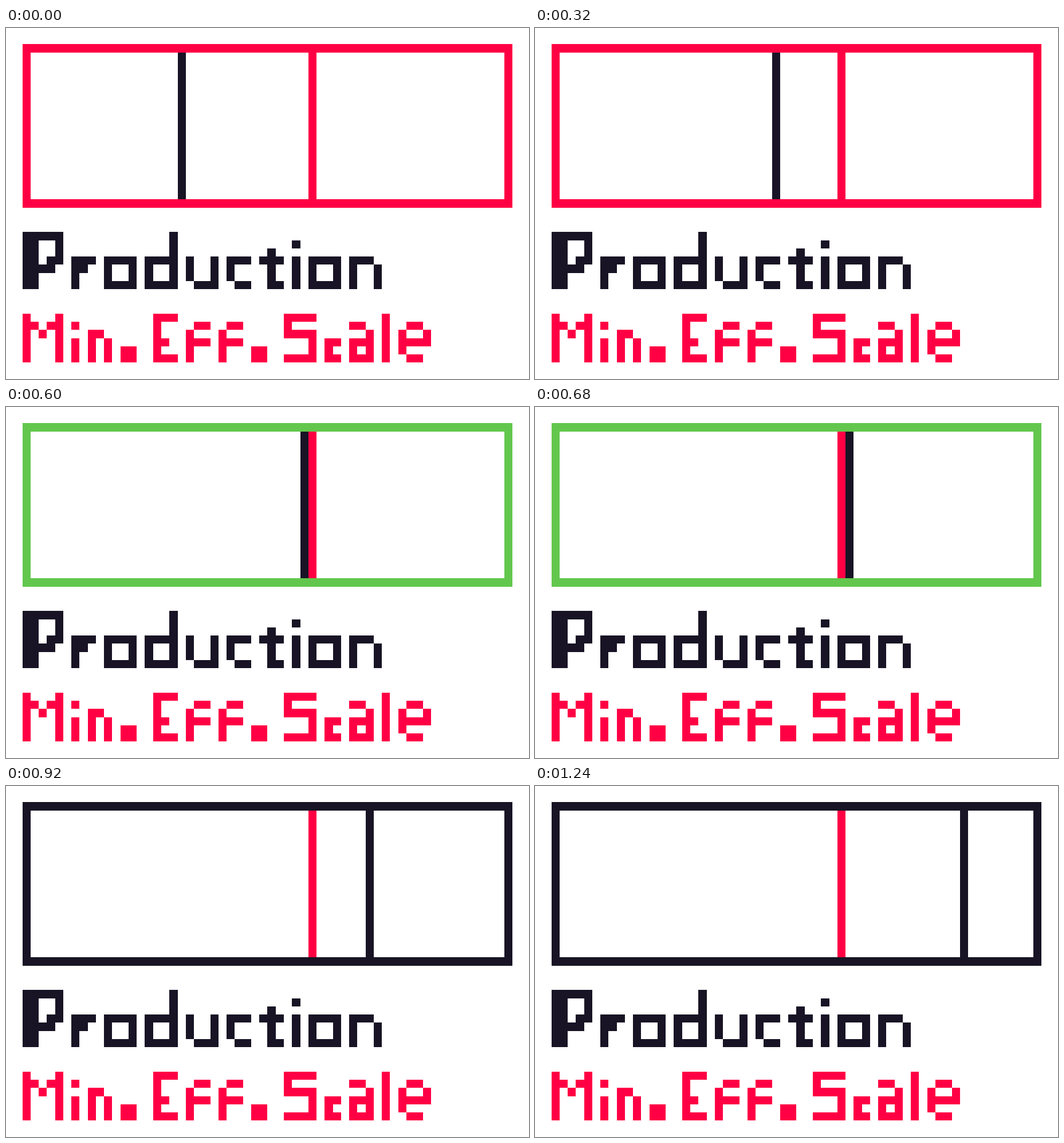
These frames come from a looping animation (913 by 613 pixels, 1280 ms). An HTML page:

```html
<!DOCTYPE html>
<html lang="en">
<head>
<meta charset="utf-8">
<title>Production and minimum efficient scale</title>
<style>
  html, body { margin: 0; width: 100%; height: 100%; overflow: hidden; background: #fff; }
  svg { display: block; width: 913px; height: 613px; }
  path { fill-rule: evenodd; }
</style>
</head>
<body>
<svg viewBox="0 0 913 613" shape-rendering="crispEdges" role="img" aria-label="Production, Min. Eff. Scale"></svg>
<script>
const RED = '#ff0044', DARK = '#181425', GREEN = '#63c74d';
const COLS = 64, ROWS = 43;
const STEP = 40, STEPS = 32;
const START = 21, GOAL = 37;

// Grid units to whole pixels
const px = c => Math.floor(c * 913 / COLS + 0.48);
const py = r => Math.floor(r * 613 / ROWS + 0.48);

const svg = document.querySelector('svg');

function outline(d, x, y) {
  return d.replace(/([MHV])(\d+) ?(\d*)/g, (_, cmd, a, b) => {
    if (cmd === 'H') return `H${px(x + +a)}`;
    if (cmd === 'V') return `V${py(y + +a)}`;
    return `M${px(x + +a)} ${py(y + +b)}`;
  });
}

function shape(d, x, y, fill) {
  const el = document.createElementNS('http://www.w3.org/2000/svg', 'path');
  el.setAttribute('d', outline(d, x, y));
  el.setAttribute('fill', fill);
  svg.append(el);
  return el;
}

// Glyphs: outline and width in grid units
const tall = {
  P: ['M0 0H5V4H4V5H2V7H0ZM2 1H4V3H3V4H2Z', 5],
  r: ['M0 3H3V4H2V5H1V7H0Z', 3],
  o: ['M0 3H4V7H0ZM1 4H3V6H1Z', 4],
  d: ['M3 0H4V7H0V3H3ZM1 4H3V6H1Z', 4],
  u: ['M0 3H1V6H3V3H4V7H1V6H0Z', 4],
  c: ['M0 3H3V4H1V6H3V7H1V6H0Z', 3],
  t: ['M1 2H2V3H3V4H2V6H3V7H1V4H0V3H1Z', 3],
  i: ['M0 1H1V2H0ZM0 3H1V7H0Z', 1],
  n: ['M0 3H3V4H4V7H3V4H1V7H0Z', 4]
};
const small = {
  M: ['M0 0H1V1H2V2H3V1H4V0H5V6H4V2H3V3H2V2H1V6H0Z', 5],
  i: ['M0 1H1V2H0ZM0 3H1V6H0Z', 1],
  n: ['M0 2H2V3H3V6H2V3H1V6H0Z', 3],
  '.': ['M0 4H2V6H0Z', 2],
  E: ['M0 0H3V1H1V3H2V4H1V5H3V6H0Z', 3],
  f: ['M1 1H3V2H1V3H3V4H1V6H0V2H1Z', 3],
  S: ['M0 0H4V1H1V2H4V6H0V5H3V3H0Z', 4],
  c: ['M0 3H2V4H1V5H2V6H0Z', 2],
  a: ['M0 1H2V2H3V6H0V3H2V2H0ZM1 4H2V5H1Z', 3],
  l: ['M0 0H1V6H0Z', 1],
  e: ['M1 1H3V2H4V4H1V5H0V2H1ZM1 2H3V3H1ZM1 5H3V6H1Z', 4]
};

function write(text, font, x, y, fill) {
  for (const ch of text) {
    if (ch === ' ') { x += 1; continue; }
    const [d, width] = font[ch];
    shape(d, x, y, fill);
    x += width + 1;
  }
}

const BAR = 'M0 0H1V18H0Z';
const box = shape('M0 0H60V20H0ZM1 1H59V19H1Z', 2, 2, RED);
shape(BAR, GOAL, 3, RED);
const bar = shape(BAR, START, 3, DARK);
write('Production', tall, 2, 25, DARK);
write('Min. Eff. Scale', small, 2, 35, RED);

function draw() {
  const col = START + Math.floor(performance.now() / STEP) % STEPS;
  const gap = col - GOAL;
  bar.setAttribute('d', outline(BAR, col, 3));
  box.setAttribute('fill', Math.abs(gap) <= 1 ? GREEN : gap < 0 ? RED : DARK);
  requestAnimationFrame(draw);
}
draw();
</script>
</body>
</html>
```
